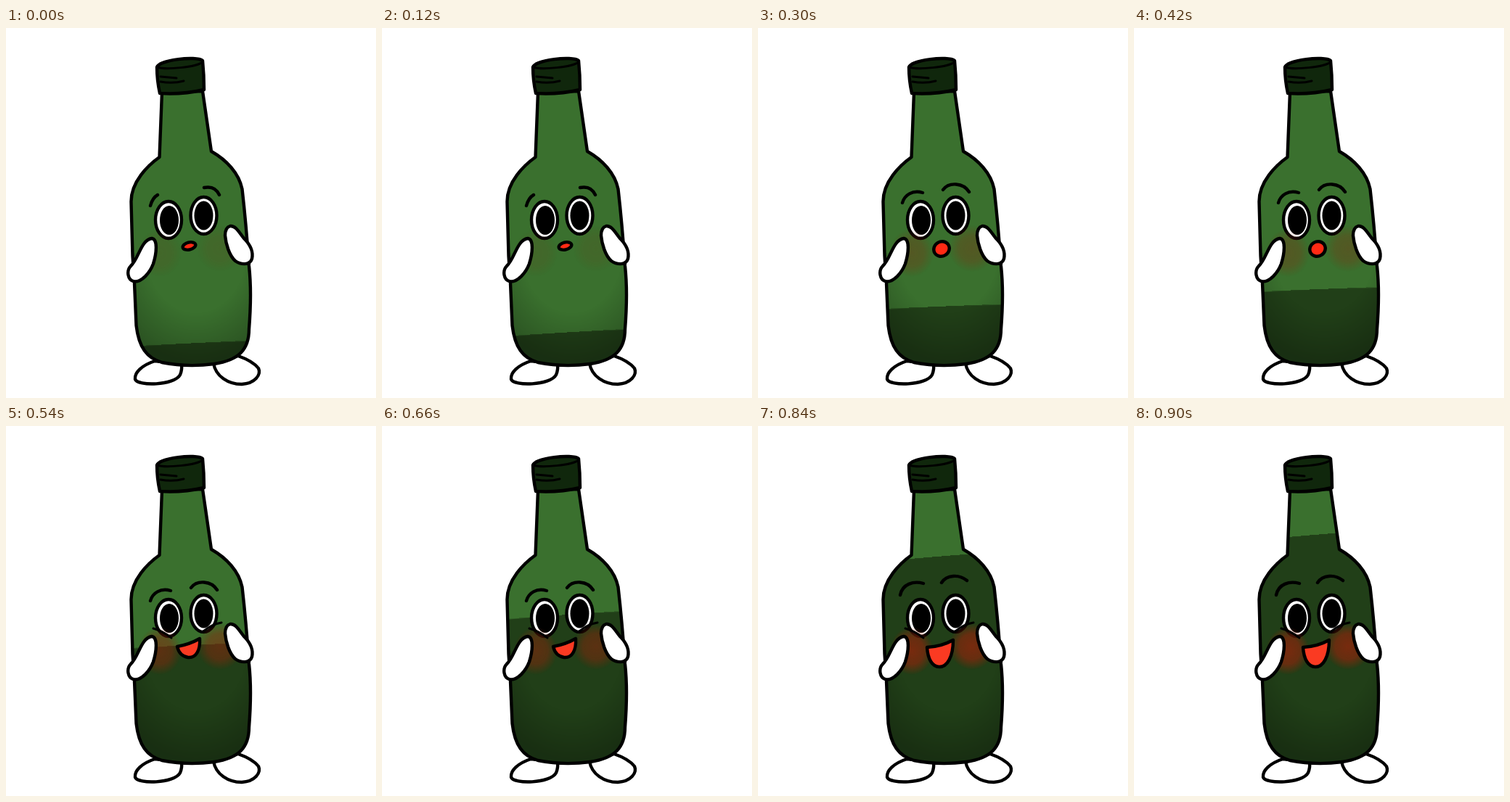
Recreate the animation shown at these times as an HTML page. Size 510 by 510 pixels, loop 960 ms.

```html
<!DOCTYPE html>
<html lang="en">
<head>
<meta charset="utf-8">
<title>Filling bottle</title>
<style>
  html, body { margin: 0; width: 100%; height: 100%; overflow: hidden; background: #fff; }
  svg { display: block; width: 100%; height: 100%; }
  .ink { fill: none; stroke: #000; stroke-width: 4.4; stroke-linecap: round; stroke-linejoin: round; }
  .white { fill: #fff; }
  .red { fill: #ff2a14; }
  .smile { fill: #fa3a22; }

  .liquid { fill: #213f18; animation: fill .96s infinite; }
  .blush { animation: blush .96s step-end infinite; }
  .mood { opacity: 0; animation: show .96s step-end infinite; }
  .m2 { animation-delay: -.72s; }
  .m3 { animation-delay: -.48s; }
  .m4 { animation-delay: -.24s; }

  /* each stretch moves in 60 ms steps */
  @keyframes fill {
    0%     { transform: translate(255px, 434.5px) rotate(-2.8deg); animation-timing-function: steps(2); }
    12.5%  { transform: translate(255px, 419.5px) rotate(-3.4deg); animation-timing-function: steps(2); }
    25%    { transform: translate(255px, 395.5px) rotate(-2.3deg); animation-timing-function: steps(3); }
    43.75% { transform: translate(255px, 360px) rotate(-2.2deg); animation-timing-function: steps(2); }
    56.25% { transform: translate(255px, 302px) rotate(-2.6deg); animation-timing-function: steps(3); }
    75%    { transform: translate(255px, 239px) rotate(-4.6deg); animation-timing-function: steps(3); }
    93.75%, 100% { transform: translate(255px, 149.5px) rotate(-4.6deg); animation-timing-function: step-end; }
  }
  @keyframes blush {
    0%  { opacity: .13; }
    25% { opacity: .37; }
    50% { opacity: .65; }
    75%, 100% { opacity: .95; }
  }
  @keyframes show {
    0% { opacity: 1; }
    25%, 100% { opacity: 0; }
  }
</style>
</head>
<body>
<svg viewBox="0 0 510 510">
  <defs>
    <path id="body" d="M215 88L211.5 178C196 189 172 212 172.5 240L174.5 314L177 352L179.5 410C183 440 194 455 215 461Q250 468 287 463C320 458 335 444 335 415Q339 365 335 328Q331 270 325.5 222C321 200 304 182 283 170L271 87Z"/>
    <clipPath id="inside"><use href="#body"/></clipPath>
    <radialGradient id="shade" gradientUnits="userSpaceOnUse" cx="0" cy="0" r="1" gradientTransform="translate(262 310) scale(125 150)">
      <stop offset=".55" stop-opacity="0"/>
      <stop offset="1" stop-opacity=".25"/>
    </radialGradient>
    <radialGradient id="glow">
      <stop offset="0" stop-color="#8c260d" stop-opacity=".85"/>
      <stop offset=".55" stop-color="#8c260d" stop-opacity=".7"/>
      <stop offset="1" stop-color="#8c260d" stop-opacity="0"/>
    </radialGradient>
    <g id="brows"><path d="M199 241C202 230 213 223 227 227M255 223C263 212 283 213 291 226"/></g>
    <g id="cheeks"><path d="M203 279Q215 282 228 292M272 283Q284 273 297 271" stroke-width="3"/></g>
  </defs>

  <g class="ink white">
    <path d="M205 459C187 465 177 475 178 484C181 494 232 493 240 478Q243 471 242 463Z"/>
    <path d="M286 462C289 480 306 491 325 491C343 490 352 478 348 469Q340 459 320 452Z"/>
  </g>

  <use href="#body" fill="#3a702e"/>
  <g clip-path="url(#inside)">
    <path class="liquid" d="M-200 5Q0-5 200 5V500H-200Z"/>
    <rect x="165" y="310" width="180" height="165" fill="url(#shade)"/>
  </g>

  <g class="ink">
    <g class="white">
      <ellipse cx="224" cy="264.5" rx="18" ry="25.5"/>
      <ellipse cx="272.5" cy="258.5" rx="18" ry="25.5"/>
    </g>
    <g fill="#000" stroke="none">
      <ellipse cx="225" cy="265" rx="13" ry="20"/>
      <ellipse cx="272.5" cy="258.5" rx="13" ry="20"/>
    </g>
  </g>

  <g class="blush" clip-path="url(#inside)" fill="url(#glow)">
    <ellipse cx="212" cy="310" rx="30" ry="33"/>
    <ellipse cx="295" cy="304" rx="32" ry="32"/>
  </g>

  <use href="#body" class="ink"/>
  <g class="ink">
    <path fill="#10270c" d="M208 54C211 44 262 38 271 45Q273 65 273 85Q243 92 212 90Q208 72 208 54Z"/>
    <path d="M208 54C220 58 262 54 271 47M213 67L235 69M213 74Q230 77 245 73" stroke-width="3"/>
  </g>

  <g class="ink">
    <g class="mood">
      <path d="M199 245Q202 234 209 230M273 220Q288 217 294 230"/>
      <ellipse class="red" cx="252.5" cy="300.5" rx="9" ry="5" transform="rotate(-14 252.5 300.5)"/>
    </g>
    <g class="mood m2">
      <use href="#brows"/>
      <ellipse class="red" cx="253" cy="304.5" rx="11" ry="10" transform="rotate(-30 253 304.5)"/>
    </g>
    <g class="mood m3">
      <use href="#brows"/>
      <use href="#cheeks"/>
      <path class="smile" d="M236 304Q253 301 267 293C268 309 262 320 251 319Q239 317 236 304Z"/>
    </g>
    <g class="mood m4">
      <path d="M196 233C199 218 214 213 228 217M253 216C260 205 277 204 288 213"/>
      <use href="#cheeks"/>
      <path class="smile" d="M233 305Q253 304 269 295C269 318 261 332 250 332C240 332 234 321 233 305Z"/>
    </g>
  </g>

  <g class="ink white">
    <path d="M201 290C209 291 208 309 203 325C198 338 187 350 177 349.5C167 348 166 334 172 328C183 318 186 292 201 290Z"/>
    <path d="M309 273C317 272 322 283 328 290C337 299 341 309 339 318C336 328 323 326 316 321C308 314 303 298 302 286Q302 275 309 273Z"/>
  </g>
</svg>
</body>
</html>
```
